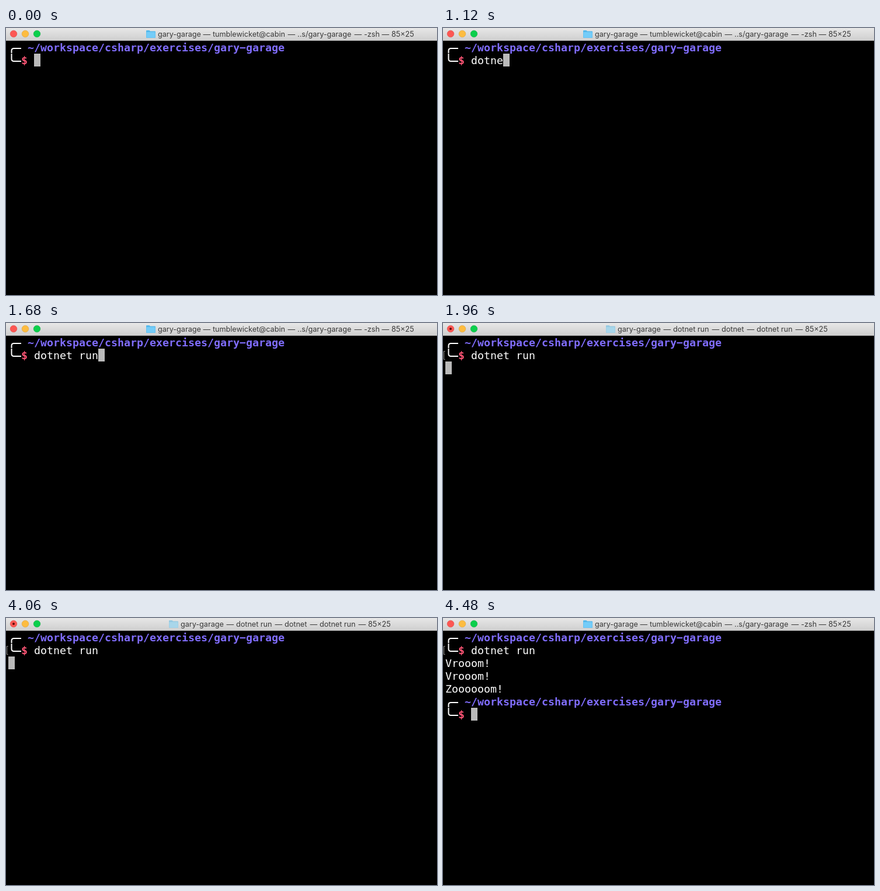
Recreate the animation shown at these times as an HTML page. Size 738x458 px, loop 8000 ms.

```html
<!DOCTYPE html>
<html lang="en">
<head>
<meta charset="utf-8">
<title>Terminal</title>
<style>
  html, body { margin: 0; width: 100%; height: 100%; overflow: hidden; background: #000; }
  svg { display: block; width: 738px; height: 458px; }
  text { white-space: pre; }
  .bar { font: 12.6px Inter, Roboto, sans-serif; fill: #393939; }
  .term { font: 18.27px "DejaVu Sans Mono", Menlo, monospace; fill: #fff; }
  .path, .sign { font-weight: bold; }
  .path { fill: #806dff; }
  .sign { fill: #ff5575; }
  .tree { fill: none; stroke: #fff; stroke-width: 2; }
</style>
</head>
<body>
<svg id="stage" viewBox="0 0 738 458">
  <defs>
    <linearGradient id="chrome" x2="0" y2="1">
      <stop stop-color="#e7e7e7"/>
      <stop offset="1" stop-color="#cfcfcf"/>
    </linearGradient>
  </defs>
  <rect width="738" height="458"/>
  <rect width="738" height="21" fill="url(#chrome)"/>
  <rect y="21" width="738" height="1" fill="#a9a9a9"/>
  <g stroke-width=".6">
    <circle cx="13" cy="10" r="5.8" fill="#fc5753" stroke="#df4744"/>
    <circle cx="33" cy="10" r="5.8" fill="#fdbc40" stroke="#de9f34"/>
    <circle cx="53" cy="10" r="5.8" fill="#0bcf4c" stroke="#13ae42"/>
  </g>
</svg>
<script>
const DURATION = 8000, CELL = 11, ROW = 22, LEFT = 4, TOP = 22;
const RUN = 1960, DONE = 4480;
const stage = document.getElementById('stage');

function add(tag, attrs, parent = stage, content = '') {
  const el = document.createElementNS('http://www.w3.org/2000/svg', tag);
  for (const name in attrs) el.setAttribute(name, attrs[name]);
  el.textContent = content;
  return parent.appendChild(el);
}

// Hold each [time, style] step until the next one.
function play(el, steps) {
  const frames = steps.map(([time, style]) => ({ ...style, offset: time / DURATION, easing: 'step-end' }));
  frames.push({ ...steps.at(-1)[1], offset: 1 });
  el.animate(frames, { duration: DURATION, iterations: Infinity });
}

function show(el, ...spans) {
  const steps = spans[0][0] > 0 ? [[0, { visibility: 'hidden' }]] : [];
  for (const [from, to] of spans) {
    steps.push([from, { visibility: 'visible' }]);
    if (to < DURATION) steps.push([to, { visibility: 'hidden' }]);
  }
  play(el, steps);
}

function write(col, row, content, parent = stage, kind = '') {
  return add('text', {
    x: LEFT + col * CELL, y: TOP + row * ROW + 18, class: `term ${kind}`
  }, parent, content);
}

function prompt(row) {
  const g = add('g');
  add('path', {
    d: 'M9.5 43V39Q9.5 35 13.5 35H26M9.5 44V53Q9.5 57 13.5 57H26',
    class: 'tree', transform: `translate(0 ${row * ROW})`
  }, g);
  write(3, row, '~/workspace/csharp/exercises/gary\u2212garage', g, 'path');
  write(2, row + 1, '$', g, 'sign');
  return g;
}

function title(back, front, parts) {
  const g = add('g');
  const x = parts[0][0] - 20;
  add('path', { d: `M${x} 16V5q0-1 1-1h4.5l1.5 1.5h8q1 0 1 1V16q0 1-1 1h-14q-1 0-1-1`, fill: back }, g);
  add('rect', { x: x + .5, y: 7, width: 15, height: 9.5, rx: .8, fill: front }, g);
  parts.forEach(([left, label, joined], i) => {
    if (i && !joined) add('text', { x: left - 16.5, y: 15, class: 'bar' }, g, '—');
    add('text', { x: left, y: 15, class: 'bar' }, g, label);
  });
  return g;
}

const idle = title('#55b9ec', '#74ccf8', [
  [260, 'gary-garage'], [354, 'tumblewicket@cabin'], [499, '..s/gary-garage'], [613, '-zsh'], [660, '85×25']
]);
const running = title('#96cae2', '#a8d6ea', [
  [299, 'gary-garage'], [394, 'dotnet run'], [477, 'dotnet'], [537, 'dotnet run'], [620, '85×25']
]);
const nested = title('#96cae2', '#a8d6ea', [
  [273, 'gary-garage'], [368, 'dotnet run'], [451, 'dotnet'], [511, 'dotnet'], [564, 'dotnet run'], [647, '85×25']
]);
// The last child process is joined by an arrow instead of a dash.
nested.querySelectorAll('text')[7].remove();
add('path', { d: 'M554.5 11l4-2.3v4.6z', fill: '#393939' }, nested);

show(idle, [0, RUN], [DONE, DURATION]);
show(running, [RUN, 2240], [4060, 4340]);
show(nested, [2240, 4060], [4340, DONE]);
show(add('circle', { cx: 13, cy: 10, r: 2, fill: '#5c0a08' }), [RUN, DONE]);

prompt(0);
const mark = add('path', { d: 'M3.5 48.5h-2v14h2', fill: 'none', stroke: '#999' });
show(mark, [RUN, DURATION]);

const command = 'dotnet run';
const keyTimes = [700, 840, 980, 1120, 1120, 1260, 1400, 1540, 1540, 1680];
const typed = write(4, 1, '');
[...command].forEach((key, i) => show(add('tspan', {}, typed, key), [keyTimes[i], DURATION]));

const output = add('g');
['Vrooom!', 'Vrooom!', 'Zoooooom!'].forEach((line, i) => write(0, 2 + i, line, output));
output.append(prompt(5));
show(output, [DONE, DURATION]);

const at = (col, row) => ({ transform: `translate(${LEFT + col * CELL}px, ${TOP + row * ROW}px)` });
const moves = new Map([[0, at(4, 1)]]);
keyTimes.forEach((time, i) => moves.set(time, at(5 + i, 1)));
moves.set(RUN, at(0, 2)).set(DONE, at(4, 6));
play(add('rect', { width: CELL, height: ROW, fill: '#bababa' }), [...moves]);
</script>
</body>
</html>
```
